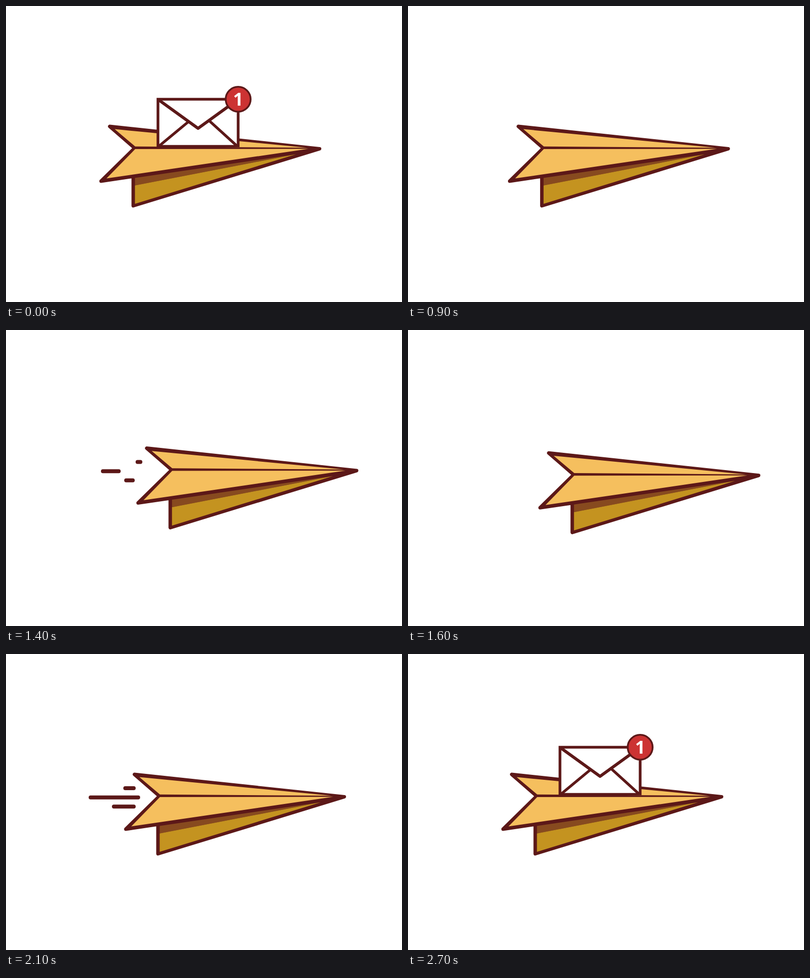
Write an HTML page that moves like this. It is 800x600 px and loops after 3.1 s.

```html
<!DOCTYPE html>
<html lang="en">
<head>
<meta charset="utf-8">
<title>Paper plane mail</title>
<style>
  html, body { margin: 0; width: 100%; height: 100%; overflow: hidden; background: #fff; }
  svg { display: block; width: 100vw; height: 100vh; }
  .ink { fill: none; stroke: #5c1818; }
  .dark { fill: #5c1818; stroke: #5c1818; stroke-width: 7; stroke-linejoin: round; }
  .wing { fill: #f5bf5e; }
  .keel { fill: #c49320; }
  .shade { fill: #874a1f; }
  .trail { stroke-width: 8; stroke-linecap: round; }
  text { font: 700 36px "Open Sans", "Noto Sans", sans-serif; fill: #fff; text-anchor: middle; }
</style>
</head>
<body>
<svg viewBox="0 0 800 600">
  <clipPath id="aboveFold"><rect width="800" height="286"/></clipPath>
  <g id="plane">
    <g id="trails" class="ink trail"></g>
    <path class="dark" d="M209.5 244L633.5 289.5L257 405V345.4L192 355L260 288Z"/>
    <path class="wing" d="M219.5 249.6L608 287.3L261 284.7Z"/>
    <path class="wing" d="M261 290L611 289.5L203 349.5Z"/>
    <path class="shade" d="M260.5 348.5L586 300.5L260.5 363.8Z"/>
    <path class="keel" d="M260.5 363.8L586 300.5L260.5 401Z"/>
  </g>
  <g clip-path="url(#aboveFold)">
    <g id="mail">
      <rect x="307" y="189" width="162" height="95.5" fill="#fff"/>
      <g class="ink" stroke-width="5.5">
        <path d="M309 284L368 235M467 284L411 233"/>
        <path d="M308 190L388 248L468 190" stroke-width="6" stroke-linejoin="round"/>
        <rect x="307" y="189" width="162" height="95.5"/>
      </g>
      <circle class="ink" cx="469" cy="189" r="25.2" stroke-width="3.6" style="fill:#cc3333"/>
      <text x="469" y="202">1</text>
    </g>
  </g>
</svg>
<script>
  const LOOP = 3100, STEP = 100;
  const $ = id => document.getElementById(id);

  // Ease-in-out, cubic-bezier(.42, 0, .58, 1)
  function ease(u) {
    let lo = 0, hi = 1, s = 0.5;
    for (let i = 0; i < 24; i++) {
      s = (lo + hi) / 2;
      const x = s * (1.26 * (1 - s) ** 2 + 1.74 * s * (1 - s) + s * s);
      if (x < u) lo = s; else hi = s;
    }
    return s * s * (3 - 2 * s);
  }

  // Eased value of a track of [time, value] keys
  function at(t, keys) {
    if (t <= keys[0][0]) return keys[0][1];
    for (let i = 1; i < keys.length; i++) {
      const [t0, v0] = keys[i - 1], [t1, v1] = keys[i];
      if (t < t1) return v0 + (v1 - v0) * ease((t - t0) / (t1 - t0));
    }
    return keys[keys.length - 1][1];
  }

  const planeX = [[600, 0], [800, -48], [1000, 74.8], [1900, 74.8], [2400, 0]];
  const planeY = [[1000, 0], [1200, -10], [1700, 6.7], [1910, 0]];
  const mailY = [[100, 0], [500, 126], [2400, 126], [2700, 0]];
  const trailStart = [[0, 1], [200, 0]];
  const trailEnd = [[200, 1], [700, 0]];

  // Left end, right end, height
  const trails = [[191, 208, 272], [121, 217, 290.7], [168, 208, 309.3]].map(([x1, x2, y]) => {
    const el = document.createElementNS("http://www.w3.org/2000/svg", "line");
    el.setAttribute("y1", y);
    el.setAttribute("y2", y);
    $("trails").append(el);
    return { el, x1, len: x2 - x1 };
  });

  const move = (id, x, y) => $(id).setAttribute("transform", `translate(${x} ${y})`);

  function draw(t) {
    move("plane", at(t, planeX), at(t, planeY));
    move("mail", 0, at(t, mailY));

    const phase = t - (t < 1900 ? 900 : 1900);
    const a = at(phase, trailStart), b = at(phase, trailEnd);
    $("trails").style.display = a < b ? "" : "none";
    for (const { el, x1, len } of trails) {
      el.setAttribute("x1", x1 + len * a);
      el.setAttribute("x2", x1 + len * b);
    }
  }

  function tick() {
    // The motion runs at ten pictures per second
    draw(Math.floor(performance.now() % LOOP / STEP) * STEP);
    requestAnimationFrame(tick);
  }
  tick();
</script>
</body>
</html>
```
